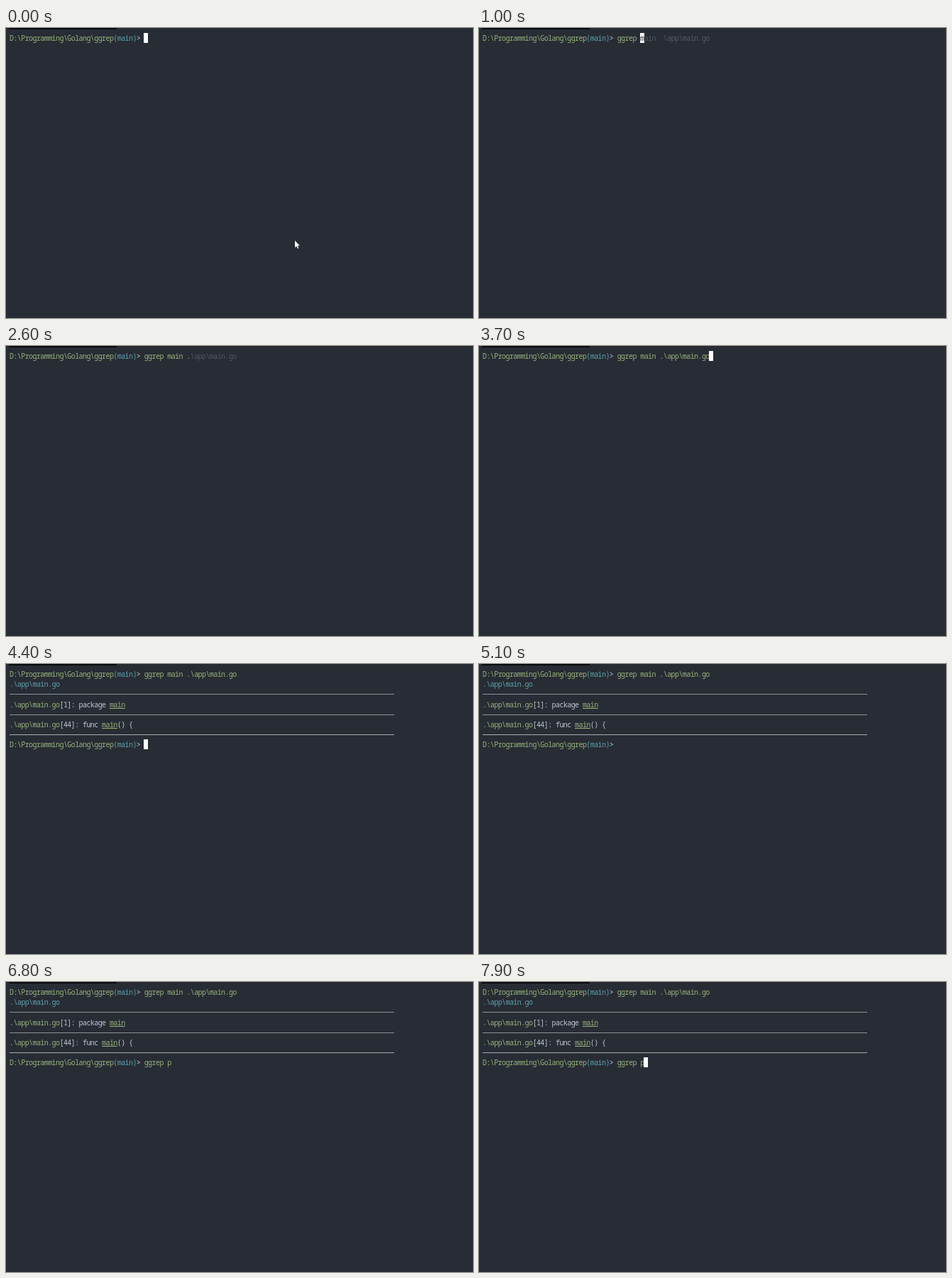
Animation, 658 px wide and 408 px high, one loop 8000 ms. Source, as an HTML page with a canvas:

```html
<!DOCTYPE html>
<html lang="en">
<head>
<meta charset="utf-8">
<title>Terminal search</title>
<style>
  html, body { margin: 0; width: 100%; height: 100%; overflow: hidden; background: #282c34; }
  canvas { display: block; }
</style>
</head>
<body>
<canvas id="stage" width="658" height="408"></canvas>
<script>
const ctx = document.getElementById('stage').getContext('2d');
const LOOP = 8000, BLINK = 530, KEY_LEAD = 50;
const CELL = 5.42, LEFT = 5, BASELINE = 18, ROW = 14.18;
const COLOR = {
  back: '#282c34', green: '#98b47c', cyan: '#5aa3b2', plain: '#c3c8d0',
  ghost: '#525863', rule: '#8d9299', cursor: '#ffffff'
};

const FILE = '.\\app\\main.go';
const COMMAND = 'ggrep main ' + FILE;
const PROMPT = [['D:\\Programming\\Golang\\ggrep', 'green'], ['(main)', 'cyan'], ['> ', 'plain']];
const PROMPT_COLS = PROMPT.reduce((n, [text]) => n + text.length, 0);

// Each entry: time, typed text so far
const FIRST = [
  [0, ''], [100, 'g'], [200, 'gg'], [300, 'ggr'], [400, 'ggre'], [500, 'ggrep'],
  [800, 'ggrep '], [1100, 'ggrep m'], [1300, 'ggrep mai'], [1400, 'ggrep main'],
  [1600, 'ggrep main '], [1800, 'ggrep main .'], [3300, COMMAND]
];
const ENTER = 4000, OUTPUT = 4100, READY = 4200;
const SECOND = [
  [READY, ''], [5500, 'gg'], [5600, 'ggr'], [5700, 'ggre'], [5800, 'ggrep p']
];

ctx.font = '300 10px "Noto Sans Mono", "DejaVu Sans Mono", monospace';
ctx.letterSpacing = (CELL - ctx.measureText('m').width) + 'px';

const colX = col => LEFT + col * CELL;
const rowY = row => BASELINE + row * ROW;

function write(text, col, row, color) {
  ctx.fillStyle = COLOR[color];
  ctx.fillText(text, colX(col), rowY(row));
  return col + text.length;
}

function writeSpans(spans, row) {
  let col = 0;
  for (const [text, color, underlined] of spans) {
    const end = write(text, col, row, color);
    if (underlined) ctx.fillRect(colX(col), Math.round(rowY(row)) + 1, colX(end) - colX(col), 1);
    col = end;
  }
}

function drawRule(row, color) {
  ctx.fillStyle = color;
  ctx.fillRect(LEFT, Math.round(rowY(row) - 4), 100 * CELL, 1);
}

function drawCursor(col, row, under = '') {
  ctx.fillStyle = COLOR.cursor;
  ctx.fillRect(Math.floor(colX(col)), Math.round(rowY(row)) - 11, 6, 14);
  if (under) write(under, col, row, 'back');
}

function drawInput(keys, row, t, active) {
  writeSpans(PROMPT, row);
  const [since, typed] = keys.filter(([time]) => time <= t).pop();
  const end = write(typed, PROMPT_COLS, row, 'green');
  const hint = typed && COMMAND.startsWith(typed) ? COMMAND.slice(typed.length) : '';
  write(hint, end, row, 'ghost');
  const lit = Math.floor((t - since + KEY_LEAD) / BLINK) % 2 === 0;
  if (active && lit) drawCursor(end, row, hint[0]);
}

function drawOutput() {
  const match = ['main', 'green', true];
  write(FILE, 0, 1, 'cyan');
  drawRule(2, COLOR.rule);
  writeSpans([[FILE, 'green'], ['[1]: package ', 'plain'], match], 3);
  drawRule(4, COLOR.rule);
  writeSpans([[FILE, 'green'], ['[44]: func ', 'plain'], match, ['() {', 'plain']], 5);
  drawRule(6, '#a9adb3');
}

function drawPointer() {
  const shape = [[0, 0], [0, 10], [2.3, 8], [4, 11.5], [5.4, 10.8], [3.9, 7.4], [7, 7.2]];
  ctx.beginPath();
  for (const [x, y] of shape) ctx.lineTo(407 + x, 299 + y);
  ctx.closePath();
  ctx.lineWidth = 1;
  ctx.strokeStyle = '#15181d';
  ctx.stroke();
  ctx.fillStyle = '#ffffff';
  ctx.fill();
}

function draw(t) {
  ctx.fillStyle = COLOR.back;
  ctx.fillRect(0, 0, 658, 408);
  ctx.fillStyle = '#2b292c';
  ctx.fillRect(0, 0, 658, 1);
  ctx.fillStyle = '#08090b';
  ctx.fillRect(4, 0, 152, 2);

  drawInput(FIRST, 0, t, t < ENTER);
  if (t >= OUTPUT) drawOutput();
  if (t >= READY) drawInput(SECOND, 7, t, true);
  else if (t >= ENTER) drawCursor(0, t < OUTPUT ? 1 : 7);
  if (t < 100) drawPointer();
}

const start = performance.now();
function tick() {
  draw((performance.now() - start) % LOOP);
  requestAnimationFrame(tick);
}
tick();
</script>
</body>
</html>
```
